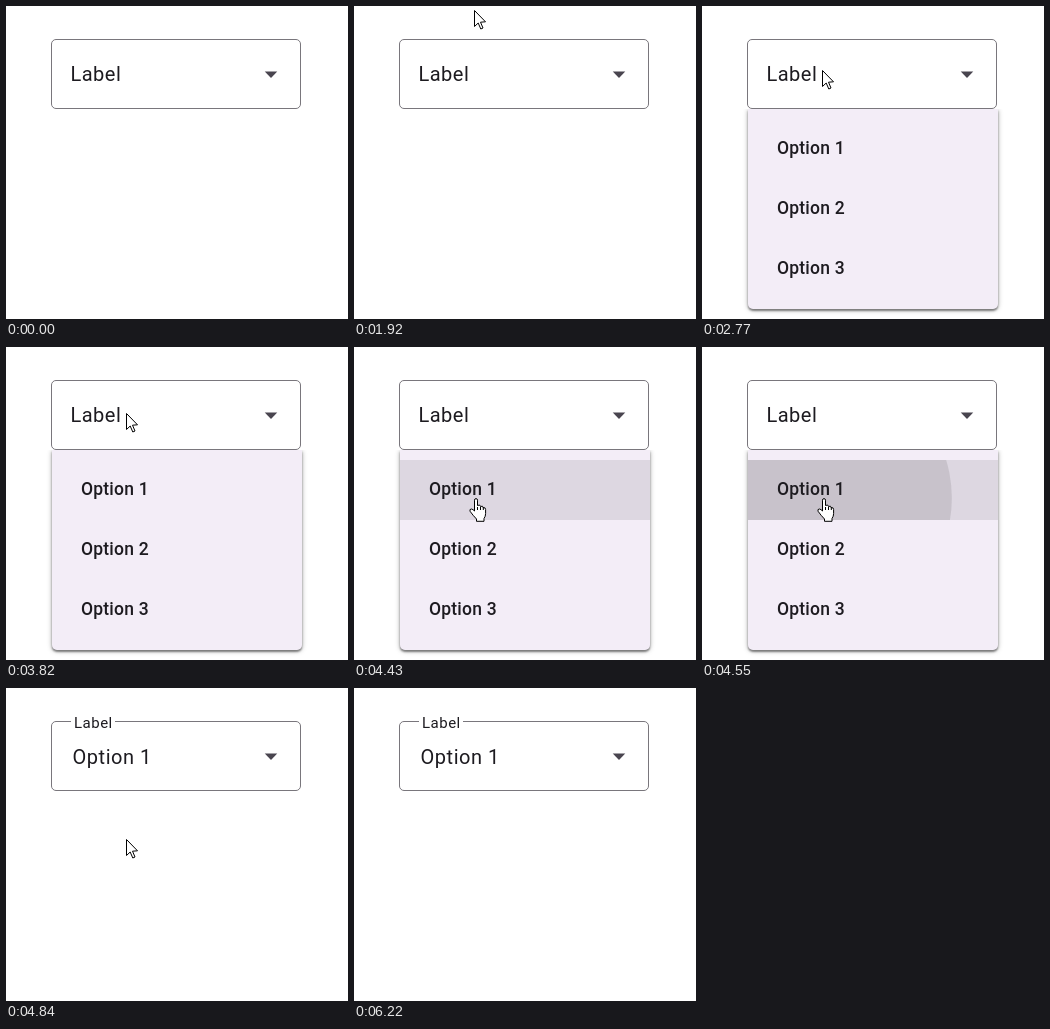
Write an HTML page with a canvas that moves like this. It is 342x313 px and loops after 9440 ms.

```html
<!DOCTYPE html>
<html lang="en">
<head>
<meta charset="utf-8">
<title>Select field</title>
<style>
  html, body { margin: 0; width: 100%; height: 100%; overflow: hidden; background: #fff; }
  canvas { display: block; }
</style>
</head>
<body>
<canvas id="stage" width="342" height="313"></canvas>
<script>
const ctx = document.getElementById('stage').getContext('2d');
const LOOP = 9440;
const OPEN = 2770, PRESS = 4475, RELEASE = 4650, DONE = 4840;
const INK = '#1d1b20';
const OPTIONS = ['Option 1', 'Option 2', 'Option 3'];
const ARROW = new Path2D('M.5 .5V16.5L4.2 13L6.8 19L9 18L6.5 12.2L11.5 11.8Z');
const HAND = new Path2D('M5.5 13V2.2Q5.5 .6 7 .6Q8.5 .6 8.5 2.2V7.5Q11.3 6 11.5 8.5' +
  'Q14 7.3 14.3 9.8Q16.6 9 16.6 11.5V15.5Q16.6 18.5 15 20.5V23.3H7.5V21' +
  'Q4 17.5 1 13.2Q.3 11 2.5 11Q4 11.3 5.5 13Z');

const clamp = v => Math.min(1, Math.max(0, v));
const span = (t, a, b) => clamp((t - a) / (b - a));
const mix = (a, b, p) => a + (b - a) * p;
const smooth = p => p * p * (3 - 2 * p);

// Progress from 0 to 1 in n equal jumps.
const stepped = (t, a, b, n) => Math.floor(span(t, a, b) * n + 1e-6) / n;

function text(str, x, y, size, weight, spacing) {
  ctx.font = `${weight} ${size}px Roboto, sans-serif`;
  ctx.letterSpacing = spacing + 'px';
  ctx.fillStyle = INK;
  ctx.fillText(str, x, y);
}

function pointer(t) {
  if (t < 1920 || t >= 6220) return null;
  if (t < 3820) return mix(4, 64, stepped(t, 1920, 2130, 6));
  if (t < 5920) return mix(66, 151, smooth(stepped(t, 3820, 4280, 11)));
  return mix(151, 313, (Math.floor((t - 5920) / 50) + 1) / 7);
}

function drawField(t, y) {
  const chosen = t >= RELEASE;
  const hover = y !== null && y > 33 && t < OPEN;
  ctx.strokeStyle = hover ? INK : '#79767c';
  ctx.lineWidth = 1;
  ctx.beginPath();
  ctx.roundRect(45.5, 33.5, 249, 69, 4.5);
  ctx.stroke();

  ctx.fillStyle = '#49454f';
  ctx.beginPath();
  ctx.moveTo(258.75, 65.5);
  ctx.lineTo(271.25, 65.5);
  ctx.lineTo(265, 72);
  ctx.fill();

  if (chosen) {
    ctx.clearRect(65, 32, 44, 3);
    text(OPTIONS[0], 66.6, 76, 20, 400, 0.5);
  }
  const p = smooth(span(t, RELEASE, RELEASE + 150));
  text('Label', mix(64.4, 68, p), mix(75, 40, p), mix(20, 15, p), 400, 0.5);
}

function panelShape(dy, blur, alpha) {
  ctx.shadowColor = `rgba(0,0,0,${alpha})`;
  ctx.shadowOffsetY = dy;
  ctx.shadowBlur = blur;
  ctx.beginPath();
  ctx.roundRect(46, 103, 250, 200, [0, 0, 5, 5]);
  ctx.fill();
}

function drawRow(t) {
  ctx.save();
  ctx.beginPath();
  ctx.rect(46, 113, 250, 60);
  ctx.clip();
  ctx.fillStyle = `rgba(29,27,32,${t < 4430 ? 0.08 : 0.1})`;
  ctx.fillRect(46, 113, 250, 60);
  if (t > PRESS) {
    const p = span(t, PRESS, PRESS + 225);
    ctx.fillStyle = 'rgba(29,27,32,0.11)';
    ctx.beginPath();
    ctx.arc(120, 151, 180 * (1 - (1 - p) ** 3.1), 0, 7);
    ctx.fill();
  }
  ctx.restore();
}

function drawPanel(t, y) {
  if (t < OPEN || t >= RELEASE + 100) return;
  ctx.save();
  ctx.globalAlpha = 1 - span(t, RELEASE, RELEASE + 100);
  ctx.beginPath();
  ctx.rect(0, 103, 342, 210);
  ctx.clip();
  ctx.fillStyle = '#f3edf7';
  panelShape(1, 5, 0.35);
  panelShape(2, 2, 0.4);
  ctx.shadowColor = 'transparent';
  if (y >= 113) drawRow(t);
  OPTIONS.forEach((name, i) => text(name, 75, 148 + i * 60, 17.5, 500, 0.2));
  ctx.restore();
}

function drawPointer(t, y) {
  if (y === null) return;
  const hand = y >= 113 && t < DONE;
  const path = hand ? HAND : ARROW;
  ctx.save();
  ctx.translate(hand ? 115 : 120, Math.round(y));
  ctx.lineWidth = 1;
  ctx.lineJoin = 'round';
  ctx.fillStyle = '#fff';
  ctx.strokeStyle = '#000';
  ctx.fill(path);
  ctx.stroke(path);
  if (hand) {
    ctx.beginPath();
    for (const x of [8.5, 11.5, 14.3]) {
      ctx.moveTo(x, 9);
      ctx.lineTo(x, 12);
    }
    ctx.stroke();
  }
  ctx.restore();
}

const start = performance.now();

function frame() {
  const t = (performance.now() - start) % LOOP;
  const y = pointer(t);
  ctx.clearRect(0, 0, 342, 313);
  drawField(t, y);
  drawPanel(t, y);
  drawPointer(t, y);
  requestAnimationFrame(frame);
}
frame();
</script>
</body>
</html>
```
